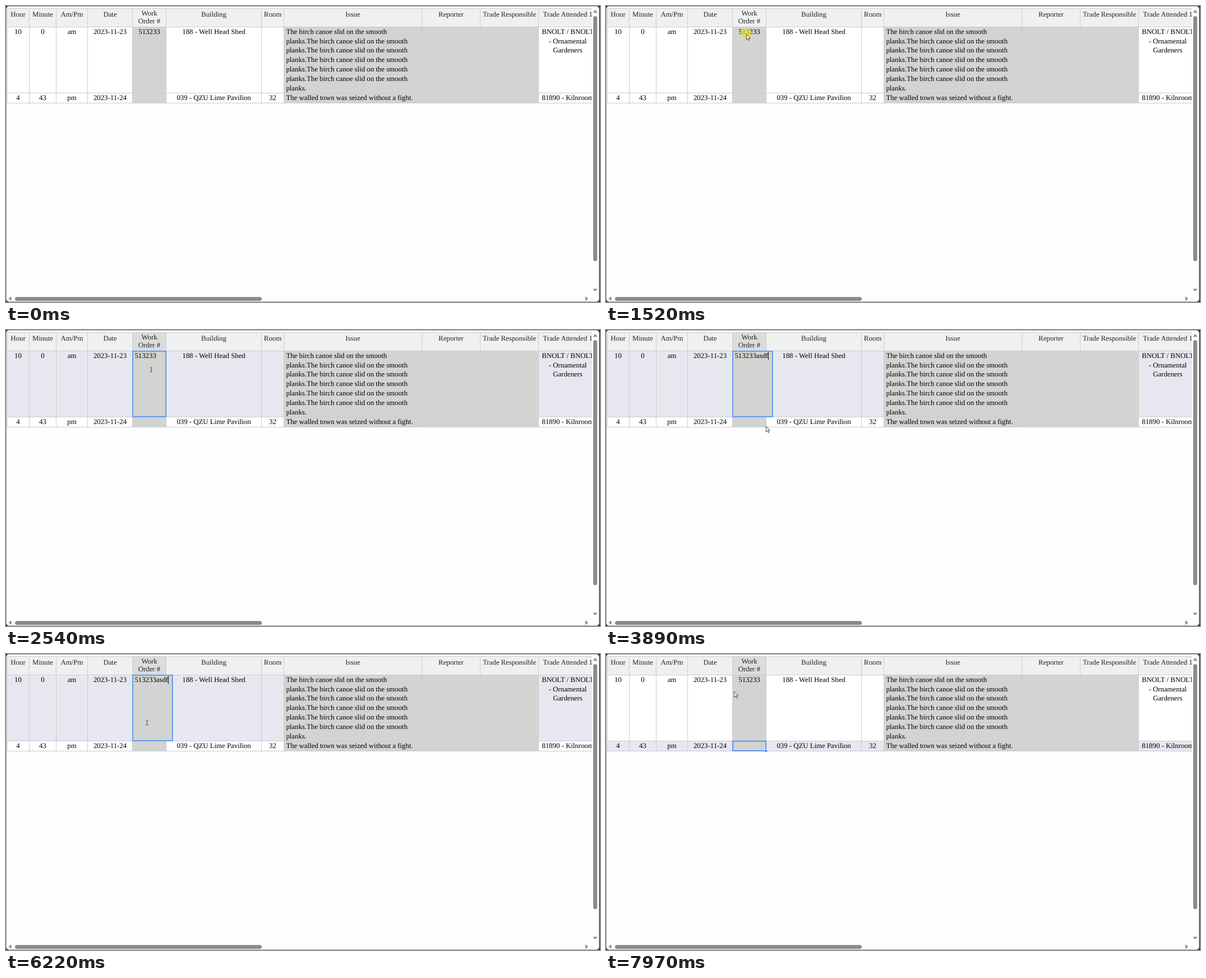
Write an HTML page that moves like this. It is 1059 px wide and 529 px high and loops after 8 s.

```html
<!DOCTYPE html>
<html lang="en">
<head>
<meta charset="utf-8">
<title>Work order table</title>
<style>
  html, body { margin: 0; width: 100%; height: 100%; overflow: hidden; background: #fefefe; }
  svg { display: block; }
  text { font: 12.8px "Liberation Serif", "Times New Roman", serif; text-rendering: geometricPrecision; white-space: pre; }
  .mid { text-anchor: middle; }
  .head { fill: #222; }
  .grey { fill: #d2d4d2; }
  .line { fill: #ccc; }
  .bar { fill: #8b8b8b; }
  .blue { fill: none; stroke: #4b89ff; stroke-width: 1.7; }
</style>
</head>
<body>
<svg width="1059" height="529">
  <clipPath id="view"><rect width="1044.5" height="515"/></clipPath>
  <rect width="1059" height="529" fill="#3a3a3a"/>
  <rect x=".5" y=".5" width="1057" height="528" rx="5" fill="#fefefe"/>
  <g clip-path="url(#view)">
    <g id="table"></g>
    <g id="selection">
      <rect id="outline" class="blue" x="226.1" width="59.1"/>
      <rect id="handle" x="282.5" width="5" height="5" fill="#4b89ff" stroke="#fff" stroke-width=".8"/>
    </g>
    <g id="editor">
      <rect id="frame" class="blue" x="226.1" y="37.8" height="117.200" style="fill:#d2d4d2;stroke:#5292f7"/>
      <text id="typed" x="229.4" y="50"></text>
      <rect id="caret" y="39.5" width="1" height="13.5"/>
    </g>
  </g>
  <g class="bar">
    <rect x="1047" y="18" width="7" height="438" rx="3.5"/>
    <rect x="16" y="520" width="440" height="7" rx="3.5"/>
    <path d="M1046.5 12h8l-4-5zM1046.5 505.500h8l-4 4.500zM9.500 519v8l-5-4zM1033 519v8l5-4z"/>
  </g>
  <g id="pointer">
    <circle id="halo" r="9.300" cy="-.5" fill="#ece51c" opacity=".68"/>
    <path id="arrow" d="M.4 0V10.200L2.700 8.100L4.300 11.600L5.800 10.900L4.300 7.500H7.200Z" fill="#fff" stroke="#222" stroke-width=".8"/>
    <path id="beam" d="M-2-4H-.5L0-3.500L.5-4H2M0-3.500V3.500M-2 4H-.5L0 3.500L.5 4H2" fill="none" stroke="#333" stroke-width=".9"/>
  </g>
</svg>
<script>
const LOOP = 8000, LINE = 16.8;
const OPEN = 1930, CLOSE = 7700;
const $ = id => document.getElementById(id);
const show = (node, on) => node.style.display = on ? "" : "none";

// Static table
const edges = [2, 42, 90, 146, 226, 286, 456, 496, 742, 846, 950, 1054];
const ISSUE = 7, ORDER = 4;
const greyColumns = [ORDER, ISSUE, 8, 9];
const canoe = "The birch canoe slid on the smooth";
const headers = ["Hour", "Minute", "Am/Pm", "Date", "Work|Order #", "Building", "Room", "Issue",
  "Reporter", "Trade Responsible", "Trade Attended 1"];
const rows = [
  ["10", "0", "am", "2023-11-23", "513233", "188 - Well Head Shed", "",
    canoe + ("|planks." + canoe).repeat(5) + "|planks.", "", "", "BNOLT / BNOLT|- Ornamental|Gardeners"],
  ["4", "43", "pm", "2023-11-24", "", "039 - QZU Lime Pavilion", "32",
    "The walled town was seized without a fight.", "", "", "81890 - Kilnroom"]
];
const tops = [37, 155, 173];

const box = (x, y, w, h, attrs) => `<rect x="${x}" y="${y}" width="${w}" height="${h}" ${attrs}/>`;
// Baselines snap to whole pixels
const label = (content, x, y, step, cls) => content.split("|").map((line, i) =>
  `<text x="${x}" y="${Math.round(y + i * step)}" class="${cls}">${line}</text>`).join("");
const center = i => (edges[i] + edges[i + 1] - 1) / 2;

function buildTable() {
  let out = box(2, 4, 1052, 33, 'fill="#eff0f0"') + box(226, 4, 60, 33, 'id="headMark" fill="#dcdcdc"');
  rows.forEach((cells, r) => {
    const top = tops[r], height = tops[r + 1] - top;
    out += box(2, top, 1052, height, `id="row${r}"`);
    greyColumns.forEach(c => out += box(edges[c], top, edges[c + 1] - edges[c], height, 'class="grey"'));
  });
  edges.forEach((x, i) => out += box(i ? x - 1 : x, 4, 1, 170, 'class="line"'));
  [4, ...tops].forEach(y => out += box(2, y, 1052, 1, 'class="line"'));
  headers.forEach((name, c) =>
    out += label(name, center(c), name.includes("|") ? 17 : 19, 14, "mid head"));
  rows.forEach((cells, r) => cells.forEach((content, c) => {
    const x = c === ISSUE ? 499.4 : center(c);
    out += label(content, x, r ? 168 : 49.8, LINE, c === ISSUE ? "" : "mid");
  }));
  $("table").innerHTML = out;
}

// Timeline: [ms, x, y] stops for the pointer, and [from, to] spans
const path = [
  [180, 747, 277], [930, 222, 93], [1000, 223, 92], [1450, 250, 50], [2330, 250, 50],
  [2540, 259, 71], [3040, 259, 71], [3430, 336, 108], [3750, 336, 108], [3890, 285, 172],
  [4150, 271, 174], [4490, 262, 171], [5090, 262, 171], [5630, 254, 137], [5890, 254, 137],
  [6220, 251.5, 123], [6490, 228.3, 67], [LOOP, 228.3, 67]
];
const pointerHidden = [[0, 180], [2740, 3060], [6900, 7570], [CLOSE, 7970]];
const clicks = [[1520, 1610], [1780, 1860], [3490, 3550], [4560, 4640], [4780, 4890]];
const caretOff = [[2430, 2740], [5580, 6080], [6490, 6900], [7430, CLOSE]];
const within = (t, spans) => spans.some(([from, to]) => t >= from && t < to);

function pointerAt(t) {
  const next = Math.max(1, path.findIndex(stop => stop[0] > t));
  const [t0, x0, y0] = path[next - 1], [t1, x1, y1] = path[next];
  const p = Math.min(1, Math.max(0, (t - t0) / (t1 - t0)));
  const ease = p * p * (3 - 2 * p);
  return [x0 + (x1 - x0) * ease, y0 + (y1 - y0) * ease];
}

// Letters appear one by one, and are later removed at a steady pace
function typedCount(t) {
  const keys = (start, gap) => Math.min(4, Math.max(0, Math.floor((t - start) / gap) + 1));
  return keys(2740, 80) - keys(6900, 90);
}

function render(t) {
  const selected = t >= 1610, editing = t >= OPEN && t < CLOSE;
  const active = selected ? (t < CLOSE ? 0 : 1) : -1;
  rows.forEach((_, r) => $("row" + r).setAttribute("fill", r === active ? "#e7e8ef" : "#fff"));
  show($("headMark"), selected);

  show($("selection"), selected && !editing);
  if (selected) {
    $("outline").setAttribute("y", tops[active] + .8);
    $("outline").setAttribute("height", tops[active + 1] - tops[active] - .8);
    $("handle").setAttribute("y", tops[active + 1] - 2.5);
  }

  show($("editor"), editing);
  let right = 286;
  if (editing) {
    $("typed").textContent = "513233" + "asdf".slice(0, typedCount(t));
    const length = $("typed").getComputedTextLength();
    const width = Math.max(59.1, length + 11);
    right = 226.1 + width;
    $("frame").setAttribute("width", width);
    $("caret").setAttribute("x", 229.2 + length);
    show($("caret"), !within(t, caretOff));
  }

  const [x, y] = pointerAt(t);
  const overEditor = editing && x < right && y > 37 && y < 155;
  $("pointer").setAttribute("transform", `translate(${x} ${y})`);
  show($("pointer"), !within(t, pointerHidden));
  show($("halo"), within(t, clicks));
  show($("beam"), overEditor);
  show($("arrow"), !overEditor);
}

buildTable();
const start = performance.now();
function tick() {
  render((performance.now() - start) % LOOP);
  requestAnimationFrame(tick);
}
tick();
</script>
</body>
</html>
```
